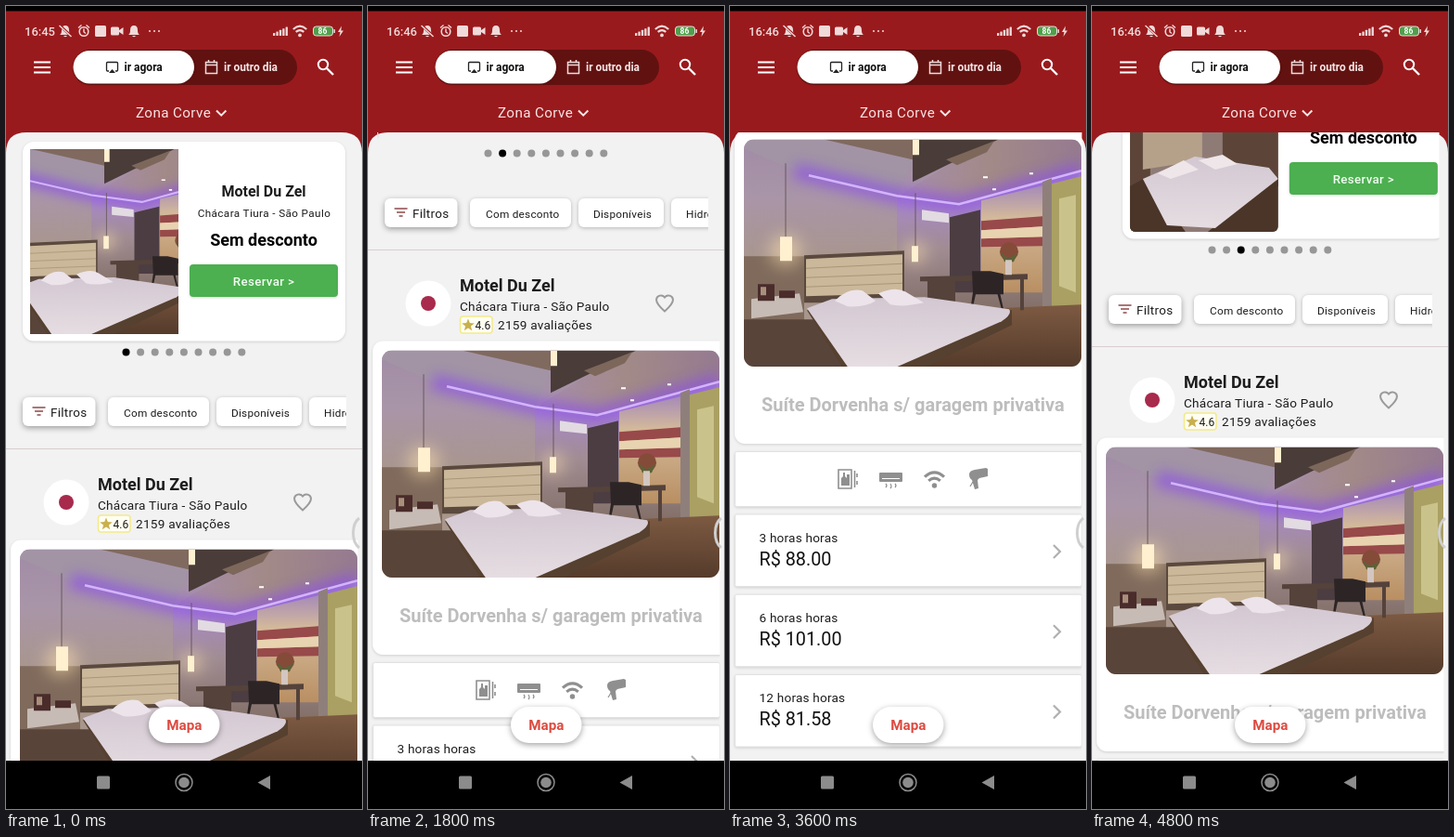
These frames come from a looping animation (384x864 px, 5000 ms). An HTML page:

```html
<!DOCTYPE html>
<html lang="pt-BR">
<head>
<meta charset="utf-8">
<title>Reservas</title>
<style>
  html, body { margin: 0; width: 100%; height: 100%; overflow: hidden; background: #000; }
  #stage { display: block; width: 100vw; height: 100vh; font-family: Roboto, Arial, sans-serif; }
  .shade { filter: drop-shadow(0 1px 2px rgba(0,0,0,.25)); }
  .soft { filter: drop-shadow(0 1px 1.5px rgba(0,0,0,.14)); }
  .lift { filter: drop-shadow(0 2px 3px rgba(0,0,0,.36)); }
</style>
</head>
<body>
<svg id="stage" viewBox="0 0 384 864" preserveAspectRatio="none">
  <defs>
    <clipPath id="feedClip"><path d="M0 136H384V812H0z"/></clipPath>
    <clipPath id="slideClip"><path d="M10 130H374.5V370H10z"/></clipPath>
    <clipPath id="chipClip"><path d="M10 410H367V465H10z"/></clipPath>
    <clipPath id="listClip"><path d="M0 560H379.5V1260H0z"/></clipPath>
    <clipPath id="photoClip"><rect x="15" y="584.5" width="364" height="244.5" rx="11"/></clipPath>
    <linearGradient id="wall" x2="0" y2="1">
      <stop offset="0" stop-color="#a08ba6"/><stop offset=".25" stop-color="#a995a8"/><stop offset=".55" stop-color="#a8968c"/>
    </linearGradient>
    <linearGradient id="back" x2="0" y2="1">
      <stop offset=".2" stop-color="#a98ac6"/><stop offset=".5" stop-color="#a08c93"/><stop offset="1" stop-color="#7c685c"/>
    </linearGradient>
    <linearGradient id="ceiling" x2="1">
      <stop offset="0" stop-color="#a78dae"/><stop offset=".5" stop-color="#a28a88"/><stop offset="1" stop-color="#957a90"/>
    </linearGradient>
    <linearGradient id="glass" x2="0" y2="1">
      <stop offset="0" stop-color="#a68bb8"/><stop offset=".3" stop-color="#d3b99a"/><stop offset="1" stop-color="#b98f62"/>
    </linearGradient>
    <linearGradient id="floor" x2="0" y2="1">
      <stop offset="0" stop-color="#7d5a42"/><stop offset="1" stop-color="#553b2b"/>
    </linearGradient>
    <linearGradient id="sheet" x2="0" y2="1">
      <stop offset="0" stop-color="#d3c8d2"/><stop offset="1" stop-color="#e6dde2"/>
    </linearGradient>
    <linearGradient id="neon" x2=".4" y2="1">
      <stop offset="0" stop-color="#42203f"/><stop offset=".5" stop-color="#6a3c9c"/><stop offset="1" stop-color="#3c2a78"/>
    </linearGradient>
    <filter id="glow" x="-20%" y="-100%" width="140%" height="300%"><feGaussianBlur stdDeviation="7"/></filter>
    <filter id="halo" x="-100%" y="-100%" width="300%" height="300%"><feGaussianBlur stdDeviation="9"/></filter>

    <symbol id="room" viewBox="0 0 364 245" preserveAspectRatio="xMidYMid slice">
      <path fill="url(#wall)" d="M0 0H364V245H0z"/>
      <path fill="#a294a5" d="M0 0H85L182 22 165 62 60 36 0 10z"/>
      <path fill="#80695f" d="M85 0H182V22z"/>
      <path fill="url(#back)" d="M165 62L232 70 364 34V200H165z"/>
      <path fill="url(#ceiling)" d="M165 62L225 25 275 0H364V34L232 70z"/>
      <path fill="#4a3c38" d="M182 0H275L225 25 182 46z"/>
      <path fill="#7d675b" d="M218 22L270 2 262 14 230 28z"/>
      <g fill="none">
        <path stroke="#8d4fe8" stroke-width="18" opacity=".65" filter="url(#glow)" d="M55 34L165 61 232 70 364 34"/>
        <path stroke="#d3b4ff" stroke-width="2.500" d="M70 39L165 61 232 70 364 34"/>
      </g>
      <path fill="#4b3d42" d="M222 84L255 76V165H222z"/>
      <path fill="url(#glass)" d="M256 66L322 50V165H256z"/>
      <path fill="#98494a" d="M256 88L322 83V94L256 98zM256 107L322 105V115L256 116z"/>
      <path fill="#e8d3b0" d="M256 98L322 94V105L256 107z"/>
      <path fill="#8f7f7b" d="M322 46L332 42V188H322z"/>
      <path fill="#aaa063" d="M332 48L364 40V200L332 182z"/>
      <path fill="#c9c28a" d="M340 64L358 60V165L340 158z"/>
      <path fill="url(#floor)" d="M180 186L364 178V245H180z"/>
      <path fill="#7f6a5c" d="M0 126H65V200H0z"/>
      <path fill="#59443a" d="M0 194H76L112 245H0z"/>
      <g fill="#ffe2b0" opacity=".55" filter="url(#halo)"><circle cx="45" cy="120" r="17"/><circle cx="185" cy="122" r="12"/></g>
      <path fill="#5b493e" d="M65 125L173 120V176H65z"/>
      <path fill="#cbb79a" d="M67 129L171 124V166L67 169z"/>
      <path fill="none" stroke="#a99578" d="M67 139L171 134M67 149L171 145M67 159L171 155"/>
      <path fill="#c7bcb5" d="M8 172L60 166 64 186 8 193z"/>
      <path fill="#4a2c2b" d="M15 156h18v18H15zM38 163h17v8H38z"/>
      <path fill="#a8907c" d="M18 159h6v9h-6z"/>
      <path fill="none" stroke="#69595a" d="M45 26V105M185 58V115"/>
      <path fill="#fff0d0" d="M39 105H52V131H39zM181 115H188V132H181zM182 0H189V17H182z"/>
      <path fill="#e2dbe2" d="M192 76L221 80V90L192 87z"/>
      <path fill="#54423b" d="M190 148L306 145V151H302V184H298V151L228 153V188H198V153H190z"/>
      <path fill="#2d2525" d="M246 142h20l14 3v22h-30l-4 18h-2l3-20zM276 165l5 22h-2l-6-22z"/>
      <circle cx="286" cy="121" r="10" fill="#844b39"/>
      <path fill="#5d6138" d="M277 122l8 6 10-5-4 9h-10z"/>
      <path fill="#d3c6c0" d="M282 130h7v16h-7z"/>
      <path fill="#56402f" d="M68 184L106 245H196L289 200V184z"/>
      <path fill="url(#sheet)" d="M68 182L95 172 195 170 286 183Q290 188 278 196L165 245H112z"/>
      <path fill="#ece4ea" d="M98 174Q112 159 128 163L142 174Q132 181 112 180zM145 166Q163 158 174 164L194 176Q172 181 158 178z"/>
      <path fill="#fff" d="M258 40h5v2h-5zM268 53h4v2h-4zM308 36h4v2h-4z"/>
    </symbol>
    <symbol id="lounge" viewBox="0 0 160 199" preserveAspectRatio="xMidYMid slice">
      <path fill="url(#neon)" d="M0 0H160V199H0z"/>
      <path fill="#241829" d="M0 0H42L12 80H0zM50 60h60v50H50z"/>
      <path fill="none" stroke="#b54338" stroke-width="4" d="M4 80L40 128M34 85L8 130M70 20L120 70"/>
      <path fill="#7865dc" d="M0 138L70 122 160 140V175L60 190 0 170z"/>
      <path fill="#281c40" d="M0 174L60 188 160 174V199H0z"/>
    </symbol>
    <symbol id="suite" viewBox="0 0 160 199">
      <path fill="#8f7b76" d="M0 0H160V199H0z"/>
      <path fill="#5c4538" d="M0 92H22V199H0zM100 92H160V150H100z"/>
      <path fill="#b5a18a" d="M14 92L78 86V122L14 132z"/>
      <path fill="#4b3529" d="M0 150L18 140 60 199H0zM160 140V199H84z"/>
      <path fill="url(#sheet)" d="M14 142L70 118 150 130 160 142 92 195 40 192z"/>
      <path fill="#eee6e8" d="M30 136L58 122 74 132 44 142zM74 122L100 116 116 126 92 132z"/>
    </symbol>
  </defs>

  <path d="M0 0H384V864H0z"/>
  <path fill="#991a1d" d="M0 5.5H384V170H0z"/>
  <path fill="#f2f2f2" d="M0 812V158Q0 136 22 136H362Q384 136 384 158V812z"/>
  <g clip-path="url(#feedClip)"><g id="feed"></g></g>
  <g id="chrome"></g>
</svg>

<script>
const $ = id => document.getElementById(id);
const text = (x, y, size, str, { w = 400, fill = '#1c1c1c', ls = 0, mid = false, id = '' } = {}) =>
  `<text x="${x}" y="${y}" font-size="${size}" font-weight="${w}" fill="${fill}" letter-spacing="${ls}"` +
  `${mid ? ' text-anchor="middle"' : ''}${id ? ` id="${id}"` : ''}>${str}</text>`;
const box = (x, y, w, h, r, fill, extra = '') =>
  `<rect x="${x}" y="${y}" width="${w}" height="${h}" rx="${r}" fill="${fill}" ${extra}/>`;
const line = (d, color, width = 2) =>
  `<path d="${d}" fill="none" stroke="${color}" stroke-width="${width}"/>`;
const shape = (d, color) => `<path d="${d}" fill="${color}"/>`;
const wifi = (x, y, k, color) => `<g transform="translate(${x} ${y}) scale(${k})">` +
  line('M-10 -7Q0 -16 10 -7M-6 -3Q0 -8 6 -3', color, 3) + `<circle cy="2" r="2.6" fill="${color}"/></g>`;

// Feed
const PITCH = 374;
const motel = 'Motel Du Zel', place = 'Chácara Tiura - São Paulo';

const card = (i, name, area, photo, height = 214.5) => `<g transform="translate(${i * PITCH})">
  ${box(18, 146, 348, height, 12, '#fff', 'class="soft"')}
  <svg x="26" y="154" width="160" height="${height - 15.5}" style="clip-path: inset(0 round 6px)">
    <use href="#${photo}" width="160" height="${height - 15.5}"/></svg>
  ${text(278, 205, 16, name, { w: 700, mid: true })}
  ${text(278.5, 227, 11.7, area, { ls: .4, mid: true })}
  ${text(278, 257.5, 18, 'Sem desconto', { w: 700, fill: '#000', mid: true })}
  ${box(198, 278, 160, 35, 4, '#4caf50', 'class="soft"')}
  ${text(278, 300.5, 13.3, 'Reservar &gt;', { w: 500, fill: '#f2fff2', ls: .35, mid: true })}</g>`;

const chip = (x, w, tx, label) => box(x, 421, w, 31, 6, '#fff', 'class="shade"') +
  text(tx, 442, 11.8, label, { ls: .25 });

const row = ([label, price], i) => {
  const y = 988 + i * 86.25;
  return box(5.5, y, 374, 77.5, 2, '#fff', 'stroke="#e2e2e2" class="soft"') +
    text(31.5, y + 29.5, 13.6, label, { ls: .2 }) +
    text(31.5, y + 54.5, 19.8, price, { fill: '#111' }) +
    line(`M349 ${y + 33}l7 7 -7 7`, '#b0b0b0', 2.2);
};

const grey = '#8f8f8f';
const amenities =
  line('M117 940h14v20h-14zM134.5 941v18M137 944v4M137 952v4', grey, 1.6) +
  shape('M120 957v-8l2-2v-4h2v4l2 2v-4h3v12z', grey) +
  box(161, 943, 25, 10, 1, grey) + line('M164 949.5h19', '#fff', 1) +
  line('M168 955q2 2 0 4M173 955q2 3 0 5M178 955q2 2 0 4', grey, 1.2) +
  wifi(220.5, 955, 1.05, grey) +
  shape('M258 945q0-4 6-5l12-2 2 1v8l-9 2-2 2 1 9-4 1-3-10q-3-2-3-6z', grey) +
  line('M262 953l-3 5', grey, 1.2);

$('feed').innerHTML = `
  <g clip-path="url(#slideClip)"><g id="slides">
    ${card(0, motel, place, 'room')}
    ${card(1, 'Motel Bravélio', 'Vila Ondure - São Paulo', 'lounge', 197.5)}
    ${card(2, 'Motel Ruvena', 'Jardim Talvo - São Paulo', 'suite')}
  </g></g>
  <g id="dots">${Array.from({ length: 9 }, (_, i) =>
    `<circle cx="${129.5 + 15.6 * i}" cy="372.5" r="4"/>`).join('')}</g>
  <g clip-path="url(#chipClip)">
    ${box(18, 421, 78.5, 31, 6, '#fff', 'class="lift"')}
    ${line('M28.5 432h14M31 436h9M33.5 440h4', '#8d4a4a', 1.4)}
    ${text(48, 441.5, 13.4, 'Filtros', { ls: .3 })}
    ${chip(110, 109, 127, 'Com desconto')}${chip(227, 92, 243, 'Disponíveis')}${chip(327, 70, 343, 'Hidro')}
  </g>
  ${line('M0 476.5H384', '#d9cdd0', 1)}
  <circle cx="65" cy="534" r="24.5" fill="#fff"/><circle cx="65" cy="534" r="8" fill="#a82a4c"/>
  ${text(99, 520.5, 18, motel, { w: 700 })}
  ${text(99, 542, 13.6, place, { ls: .25 })}
  ${box(99.5, 548, 34.5, 18, 3, '#fffef2', 'stroke="#f3ea8a" stroke-width="1.5"')}
  ${shape('M108 550.5l1.8 4.6 5 .3-3.9 3.1 1.3 4.8-4.2-2.7-4.2 2.7 1.3-4.8-3.9-3.1 5-.3z', '#c9b04e')}
  ${text(115.5, 561.5, 12, '4.6')}
  ${text(140, 561.5, 13.6, '2159 avaliações', { ls: .25 })}
  ${line('M320 542.5q-9-8-9-12.5a5 5 0 0 1 9-2.5a5 5 0 0 1 9 2.5q0 4.5-9 12.5z', '#9a9a9a', 2)}
  <g clip-path="url(#listClip)">
    ${box(5, 574.5, 400, 337.5, 11, '#fff', 'class="soft"')}
    <g clip-path="url(#photoClip)"><use href="#room" x="15" y="584.5" width="364" height="244.5"/></g>
    ${text(34, 876.5, 20, 'Suíte Dorvenha s/ garagem privativa', { w: 700, fill: '#bdbdbd' })}
    ${box(5.5, 920.5, 374, 59, 2, '#fff', 'stroke="#e2e2e2" class="soft"')}
    ${amenities}
    ${[['3 horas horas', 'R$ 88.00'], ['6 horas horas', 'R$ 101.00'], ['12 horas horas', 'R$ 81.58']].map(row).join('')}
  </g>`;

// Fixed header, floating button and system bars
const white = '#fff', pale = '#f0dada', red = '#991a1d', nav = '#8c8c8c';
const ring = (x, y, r, color, width) =>
  `<circle cx="${x}" cy="${y}" r="${r}" fill="none" stroke="${color}" stroke-width="${width}"/>`;
const bell = x => shape(`M${x - 6} 31q2-1 2-5 0-5 4-5t4 5q0 4 2 5zM${x - 2} 32h4q-2 2.5-4 0z`, pale);

$('chrome').innerHTML =
  text(20, 31.7, 13, '16:45', { fill: pale, id: 'clock', w: 500 }) +
  bell(64) + line('M58 21l13 12', red, 3) + line('M57.5 21l13 12', pale, 1.4) +
  ring(84, 27.5, 4.8, pale, 1.6) +
  line('M84 24.5v3.5l2 1.5M78 23.5l3.5-3M90 23.5l-3.5-3', pale, 1.4) +
  box(96, 21, 12, 12, 1.5, pale) +
  box(113, 22.5, 9, 9, 1.5, pale) + shape('M122 26l4.5-3v8l-4.5-3z', pale) + bell(138) +
  [155, 160, 165].map(x => `<circle cx="${x}" cy="27" r="1" fill="${pale}"/>`).join('') +
  [0, 1, 2, 3, 4].map(i => box(288 + 3.4 * i, 29 - 1.6 * i, 2.3, 3 + 1.6 * i, .5, pale)).join('') +
  wifi(317, 30, .72, pale) +
  box(331.5, 22, 21, 10, 3, '#4f9f4b', `stroke="${pale}"`) + box(353.5, 25, 1.5, 4, .5, pale) +
  text(341.5, 30.3, 8.5, '86', { fill: white, w: 700, mid: true }) +
  shape('M362 21.5l-4 6.5h2.5l-1 5 4.5-6.5h-2.7z', pale) +
  line('M30 60.5h18M30 66h18M30 71.5h18', white, 1.8) +
  box(72, 47, 242, 38, 19, '#611210') + box(72.5, 48, 130.5, 35.5, 17.75, white, 'class="soft"') +
  line('M111 70h-1.5q-1 0-1-1v-7.5q0-1 1-1h10q1 0 1 1v7.5q0 1-1 1h-1.5', '#222', 1.3) +
  shape('M111 72l3.5-4 3.5 4z', '#222') +
  text(127.5, 70, 12, 'ir agora', { w: 700, fill: '#111' }) +
  line('M215.5 60.5h12v12h-12zM215.5 63.5h12M218.5 58v3M224.5 58v3', pale, 1.5) +
  text(235, 70, 11.9, 'ir outro dia', { w: 700, fill: '#f7e6e6' }) +
  ring(342, 63, 5.2, white, 2) + line('M346 67l7 7', white, 2.4) +
  text(140, 120, 15.2, 'Zona Corve', { fill: '#f7e6e6', ls: .4 }) +
  line('M227 112.5l5.2 5.2 5.2-5.2', '#f7e6e6', 2) +
  line('M381 551Q374.5 556 374.5 567T381 583', '#cfcfcf', 3) +
  box(154, 754, 76.5, 39, 19.5, white, 'class="lift"') +
  text(192.3, 779, 15.2, 'Mapa', { w: 700, fill: '#dd4a40', mid: true }) +
  shape('M0 812H384V864H0z', '#000') +
  box(98, 828.5, 14, 14, 1.5, nav) +
  ring(192, 835.5, 9, nav, 1.5) + `<circle cx="192" cy="835.5" r="5.8" fill="${nav}"/>` +
  shape('M271.5 835.5L285 828v15z', nav);

// Motion
const LOOP = 5000, STEP = 200, CLOCK_TICK = 1800, END = 797;
const scrollKeys = [[1200, 0], [1400, 81.3], [1600, 158], [1800, 214], [2000, 250], [2200, 302], [2400, 388],
  [2600, 441], [4000, 441], [4200, 345], [4400, 252], [4600, 173], [4800, 110], [5000, 65]];
const stretchKeys = [[2400, 0], [2600, .012], [2800, .011], [3000, .006], [3200, .002], [3400, 0]];

function track(keys, t) {
  const i = keys.findIndex(k => k[0] > t);
  if (i < 0) return keys[keys.length - 1][1];
  if (!i) return keys[0][1];
  const [t0, a] = keys[i - 1], [t1, b] = keys[i];
  return a + (b - a) * (t - t0) / (t1 - t0);
}

// Fast out, slow in: cubic-bezier(.4, 0, .2, 1)
function ease(x) {
  if (x <= 0) return 0;
  if (x >= 1) return 1;
  let lo = 0, hi = 1, u;
  for (let n = 0; n < 20; n++) {
    u = (lo + hi) / 2;
    const v = 1 - u;
    if (1.2 * v * v * u + .6 * v * u * u + u ** 3 < x) lo = u; else hi = u;
  }
  return u * u * (3 - 2 * u);
}

const dots = [...$('dots').children];

function draw(now) {
  const t = Math.floor(now % LOOP / STEP) * STEP;
  const scale = 1 + track(stretchKeys, t);
  const shift = END - (track(scrollKeys, t) + END) * scale;
  const page = ease((t - 1221) / 800) + ease((t - 4198) / 800);
  $('feed').setAttribute('transform', `matrix(1 0 0 ${scale} 0 ${shift})`);
  $('slides').setAttribute('transform', `translate(${-page * PITCH})`);
  dots.forEach((d, i) => d.setAttribute('fill', i === Math.round(page) ? '#000' : '#979797'));
  $('clock').textContent = t < CLOCK_TICK ? '16:45' : '16:46';
}

let start;
function tick(now) {
  start ??= now;
  draw(now - start);
  requestAnimationFrame(tick);
}
draw(0);
requestAnimationFrame(tick);
</script>
</body>
</html>
```
